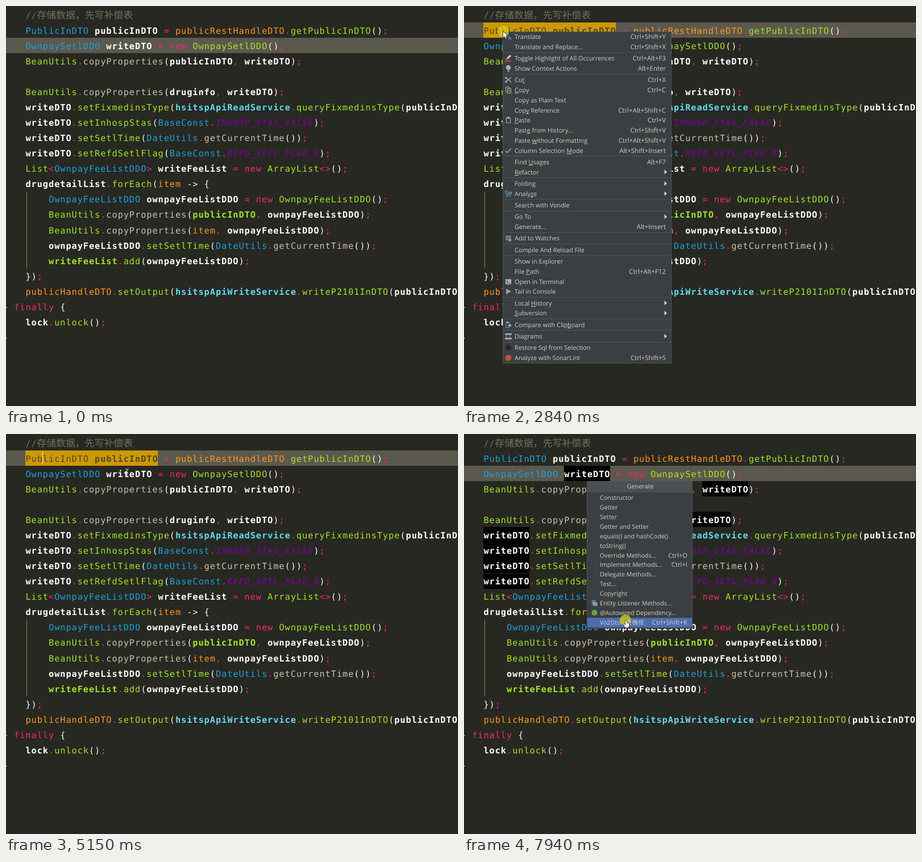
An HTML page with a canvas for the animation above (8 s loop, 795 px wide and 705 px high).

```html
<!DOCTYPE html>
<html lang="en">
<head>
<meta charset="utf-8">
<title>Editor menus</title>
<style>
html, body { margin: 0; width: 100%; height: 100%; overflow: hidden; background: #272822; }
canvas { display: block; }
</style>
</head>
<body>
<canvas id="stage" width="795" height="705"></canvas>
<script>
const ctx = document.getElementById('stage').getContext('2d');
const LOOP = 8000;
const LEFT = 34, CHAR = 10.134, ROW = 27.06, BASE = 21.7;
const MONO = '15.3px "DejaVu Sans Mono", monospace';
const HAN = '16.89px "Noto Sans CJK SC", sans-serif';
const UI = 'px "Open Sans", "Noto Sans CJK SC", sans-serif';
const GRAY = '#afb1b3', TEXT = '#cecece', PANEL = '#3c3f41', EDGE = '#515456', HOVER = '#4b6eaf';

// Prefix of a word: b type, w variable, f field, h outer variable, o parameter, k constant, c static call, p keyword
const STYLES = {
  b: ['', '#1fa0dc'], w: ['bold ', '#ffffff'], f: ['bold ', '#66d9ef'], h: ['bold ', '#a6e22e'],
  o: ['', '#fd971f'], k: ['italic bold ', '#660e7a'], c: ['', '#cfbfad'], p: ['', '#f92672'], g: ['', '#a6e22e']
};
const CODE = [
  '',
  'b:PublicInDTO w:publicInDTO = o:publicRestHandleDTO.getPublicInDTO();',
  'b:OwnpaySetlDDO w:writeDTO = p:new OwnpaySetlDDO();',
  'BeanUtils.c:copyProperties(w:publicInDTO, w:writeDTO);',
  '',
  'BeanUtils.c:copyProperties(w:druginfo, w:writeDTO);',
  'w:writeDTO.setFixmedinsType(f:hsitspApiReadService.queryFixmedinsType(w:publicInDTO));',
  'w:writeDTO.setInhospStas(b:BaseConst.k:INHOSP_STAS_FALSE);',
  'w:writeDTO.setSetlTime(b:DateUtils.c:getCurrentTime());',
  'w:writeDTO.setRefdSetlFlag(b:BaseConst.k:REFD_SETL_FLAG_0);',
  'List<b:OwnpayFeeListDDO> w:writeFeeList = p:new ArrayList<>();',
  'w:drugdetailList.forEach(o:item -> {',
  '    b:OwnpayFeeListDDO w:ownpayFeeListDDO = p:new OwnpayFeeListDDO();',
  '    BeanUtils.c:copyProperties(h:publicInDTO, w:ownpayFeeListDDO);',
  '    BeanUtils.c:copyProperties(o:item, w:ownpayFeeListDDO);',
  '    w:ownpayFeeListDDO.setSetlTime(b:DateUtils.c:getCurrentTime());',
  '    h:writeFeeList.add(w:ownpayFeeListDDO);',
  '});',
  'o:publicHandleDTO.setOutput(f:hsitspApiWriteService.writeP2101InDTO(w:publicInDTO));',
  '} p:finally {',
  'w:lock.unlock();',
  '}'
];
const TOKENS = CODE.map((line, i) => {
  let col = i === 19 || i === 21 ? -4 : 0;
  return [...line.matchAll(/(?:([a-z]):)?(\w+)|->|[^\w]/g)].map(m => {
    const text = m[2] || m[0];
    const mark = '.,;=<>'.includes(text) ? STYLES.p : ['', '#f8f8f2'];
    const [weight, color] = m[2] ? STYLES[m[1] || 'g'] : mark;
    const token = { text, weight, color, col };
    col += text.length;
    return token;
  });
});
const USES = [[2, 14], [3, 38], [5, 35], [6, 0], [7, 0], [8, 0], [9, 0]];

// Groups of [label, shortcut, icon]; & marks a mnemonic, > a submenu
const GROUPS = [
  [['Translate', 'Ctrl+Shift+Y', 'lang'], ['Translate and Replace...', 'Ctrl+Shift+X']],
  [['Toggle Highlight of All Occurrences', 'Ctrl+Alt+F3', 'pen'], ['Show Context Actions', 'Alt+Enter', 'bulb']],
  [['Cu&t', 'Ctrl+X', 'cut'], ['&Copy', 'Ctrl+C', 'copy'], ['Copy as Plain Text'],
    ['Cop&y Reference', 'Ctrl+Alt+Shift+C'], ['&Paste', 'Ctrl+V', 'paste'],
    ['Past&e from History...', 'Ctrl+Shift+V'], ['Paste &without Formatting', 'Ctrl+Alt+Shift+V'],
    ['Column Selection &Mode', 'Alt+Shift+Insert', 'check']],
  [['Find &Usages', 'Alt+F7'], ['&Refactor', '>']],
  [['Folding', '>'], ['Analy&ze', '>', 'scan']],
  [['Search with Vondle']],
  [['Go To', '>'], ['Generate...', 'Alt+Insert']],
  [['Add to Watches', '', 'watch']],
  [['Compile And Reload File']],
  [['Show in Explorer'], ['File &Path', 'Ctrl+Alt+F12'], ['Open in Terminal', '', 'term'], ['Tail in Console', '', 'play']],
  [['Local &History', '>'], ['&Subversion', '>']],
  [['Compare with Clip&board', '', 'diff']],
  [['Diagrams', '>', 'diagram']],
  [['Restore Sql from Selection', '', 'sql'], ['Analyze with SonarLint', 'Ctrl+Shift+S', 'lint']]
];
const SELECTION_ONLY = /^(Cu&t|&Copy|Copy as|Search|Add to)/;
const SHORT_GROUPS = GROUPS.map(g => g.filter(i => !SELECTION_ONLY.test(i[0]))).filter(g => g.length);

const GENERATE = [
  ['Constructor'], ['Getter'], ['Setter'], ['Getter and Setter'], ['equals() and hashCode()'], ['toString()'],
  ['Override Methods...', 'Ctrl+O'], ['Implement Methods...', 'Ctrl+I'], ['Delegate Methods...'], ['Test...'],
  ['Copyright'], ['Entity Listener Methods...', '', 'entity'], ['@Autowired Dependency...', '', 'leaf'],
  ['Vo2Dto - 老槐叔', 'Ctrl+Shift+K']
];

// Pointer moves: start, end, steps, from, to
const MOVES = [
  [120, 500, 6, [603, 480], [136, 130]],
  [580, 810, 4, [160, 105], [256, 47]],
  [970, 1050, 2, [262, 47], [270, 47]],
  [1280, 1750, 7, [270, 47], [48, 43]],
  [1910, 1990, 2, [42, 43], [36, 44]],
  [2210, 2520, 5, [40, 45], [68, 46]],
  [2680, 2680, 1, [69, 45], [69, 45]],
  [2840, 3290, 7, [69, 45], [135, 192]],
  [3290, 3520, 4, [135, 192], [150, 213]],
  [3680, 3900, 4, [146, 205], [125, 168]],
  [4050, 4290, 4, [122, 165], [112, 153]],
  [4596, 5150, 8, [114, 151], [213, 68]],
  [5220, 5220, 1, [213, 67], [213, 67]],
  [5770, 5920, 3, [220, 78], [278, 244]],
  [5920, 6150, 4, [278, 244], [290, 336]],
  [7330, 7710, 6, [290, 336], [285, 329]]
];
const PRESSES = [[1280, 2210], [2680, 2915], [4440, 4518], [5220, 5380], [6860, 6940], [7940, 8000]];

const within = (t, a, b) => t >= a && t < b;

function pointerAt(t) {
  const move = MOVES.filter(m => m[0] <= t).pop();
  if (!move) return null;
  const [a, b, n, from, to] = move;
  const step = n > 1 ? Math.min(n - 1, Math.floor((t - a) / (b - a) * (n - 1) + 0.1)) / (n - 1) : 1;
  return from.map((v, i) => v + (to[i] - v) * step);
}

function box(x, y, w, h, color) {
  ctx.fillStyle = color;
  ctx.fillRect(x, y, w, h);
}
function frame(x, y, w, h, color) {
  ctx.lineWidth = 1;
  ctx.strokeStyle = color;
  ctx.strokeRect(x, y, w, h);
}
function dot(x, y, r, color) {
  ctx.fillStyle = color;
  ctx.beginPath();
  ctx.arc(x, y, r, 0, Math.PI * 2);
  ctx.fill();
}
function line(points, color, width = 1.3) {
  ctx.beginPath();
  points.forEach(([x, y]) => ctx.lineTo(x, y));
  ctx.strokeStyle = color;
  ctx.lineWidth = width;
  ctx.stroke();
}
function shape(points, color, edge) {
  ctx.beginPath();
  points.forEach(([x, y]) => ctx.lineTo(x, y));
  ctx.closePath();
  ctx.fillStyle = color;
  if (edge) {
    ctx.strokeStyle = edge;
    ctx.lineWidth = 1.4;
    ctx.stroke();
  }
  ctx.fill();
}
function label(text, x, y, color, size = 10.9, align = 'left') {
  ctx.font = size + UI;
  ctx.textAlign = align;
  ctx.fillStyle = color;
  ctx.fillText(text, x, y);
  ctx.textAlign = 'left';
}

// Each icon is drawn around its own centre
const ICONS = {
  lang() { label('文', -6, 2, '#3d9bd0', 8); label('A', 0, 5.5, GRAY, 8.5); },
  pen(dim) {
    line([[-3, 2], [4, -5]], dim ? '#777' : '#d8d8d8', 3);
    line([[-4, 3], [-1, 0]], dim ? '#666' : '#d65a45', 3);
    line([[-6, 5.5], [5, 5.5]], dim ? '#666' : '#c75450', 1.5);
  },
  bulb() { dot(0, -1.5, 4.2, GRAY); box(-2, 3.2, 4, 1, GRAY); box(-1.5, 5, 3, 1, GRAY); },
  cut() {
    line([[-4, 3], [5, -4]], GRAY); line([[-4, -3], [5, 4]], GRAY);
    dot(-4, -3.5, 2, GRAY); dot(-4, 3.5, 2, GRAY); dot(-4, -3.5, 0.8, PANEL); dot(-4, 3.5, 0.8, PANEL);
  },
  copy() {
    frame(-4.5, -5, 6, 8, GRAY); box(-2, -3, 7, 9, PANEL); frame(-1.5, -2.5, 6, 8, GRAY);
    box(0, 0, 3, 1, GRAY); box(0, 2, 3, 1, GRAY);
  },
  paste() { frame(-3.5, -4, 7, 9, GRAY); box(-2, -5.5, 4, 3, GRAY); },
  check() { line([[-5, 0], [-2, 3.5], [5, -4]], GRAY); },
  scan() {
    frame(-5.5, -5, 4, 4, '#3d9bd0'); frame(-3.5, 1, 3, 4, '#3d9bd0');
    frame(1, -3, 4, 4, GRAY); line([[3, 1], [3, 6]], '#3d9bd0');
  },
  watch() { [-4, -1, 2].forEach(y => box(-5, y, 10, 1.3, GRAY)); line([[0, 5], [5, 5]], GRAY); dot(3, 3, 1.8, GRAY); },
  term() { box(-5, -4.5, 10, 9, GRAY); line([[-3, -2], [-1, 0], [-3, 2]], PANEL); box(0, 2, 3, 1, PANEL); },
  play() { shape([[-4, -5], [5, 0], [-4, 5]], '#9a9c9e'); },
  diff() {
    frame(-4.5, -4.5, 6, 9, '#4a9cc9'); box(-3, -6, 3, 3, GRAY);
    line([[-1, 1], [5, 1]], GRAY, 1.8); shape([[2, -2], [6, 1], [2, 4]], GRAY);
  },
  diagram() {
    box(-6, -5, 12, 2.5, GRAY); box(-6, 3, 12, 2.5, GRAY);
    line([[-3, -3], [-3, 3]], '#4a9cc9'); line([[3, -3], [3, 3]], '#4a9cc9');
  },
  sql() { dot(0, 0, 5, '#2c2522'); },
  lint() { dot(0, 0, 5.5, '#c2513f'); },
  entity() { box(-5, -5, 7, 8, '#4a88b5'); box(-2, -1, 7, 6, GRAY); [1, 3].forEach(y => box(-1, y, 5, 1, '#4a6a80')); },
  leaf() { dot(0, 0, 5, '#62a844'); }
};
function icon(name, x, y, dim) {
  ctx.save();
  ctx.translate(x, y);
  ICONS[name](dim);
  ctx.restore();
}

// Every glyph sits in the middle of its own cell
function cell(char, col, row) {
  ctx.textAlign = 'center';
  ctx.fillText(char, LEFT + (col + 0.5) * CHAR, BASE + ROW * row);
  ctx.textAlign = 'left';
}

function drawCode(selFrom, t) {
  const rowTop = i => Math.round(2 + ROW * i);
  box(0, 0, 795, 705, '#272822');
  box(0, 700, 795, 5, '#2b2328');
  box(0, rowTop(within(t, 1280, 5220) ? 1 : 2), 795, 27, '#5b594d');
  if (t >= 5550) USES.forEach(([r, c]) => box(LEFT + c * CHAR, rowTop(r), 8 * CHAR, 27, '#000'));
  if (within(t, 5220, 5550)) box(LEFT, 29, 11 * CHAR, 27, '#000');
  if (selFrom < 23) box(LEFT + selFrom * CHAR, 29, (23 - selFrom) * CHAR, 27, '#cc9900');
  box(36, 327, 1, 135, '#a87a2c');

  ctx.font = MONO;
  ctx.fillStyle = '#75715e';
  cell('/', 0, 0);
  cell('/', 1, 0);
  ctx.font = HAN;
  ctx.fillText('存储数据，先写补偿表', LEFT + 2 * CHAR, BASE);
  TOKENS.forEach((tokens, row) => tokens.forEach(({ text, weight, color, col }) => {
    ctx.font = weight + MONO;
    [...text].forEach((char, i) => {
      const selected = row === 1 && within(col + i, selFrom, 23);
      ctx.fillStyle = selected ? '#4f4526' : color;
      cell(char, col + i, row);
    });
  }));
}

function drawItemText(text, x, y, color) {
  const at = text.indexOf('&'), plain = text.replace('&', '');
  label(plain, x, y, color);
  if (at < 0) return;
  const start = x + ctx.measureText(plain.slice(0, at)).width;
  box(start, Math.round(y + 1), ctx.measureText(plain[at]).width, 1, color);
}

function drawMenu(groups, x, y, pointer, noSelection) {
  const H = 17.76, GAP = 2.55, W = 297;
  const count = groups.flat().length;
  const height = Math.round(count * H + (groups.length - 1) * GAP + 1);
  box(x, y, W, height, PANEL);
  let top = y + 0.2;
  groups.forEach((group, g) => {
    if (g) {
      box(x + 1, Math.round(top + 0.8), W - 2, 1, EDGE);
      top += GAP;
    }
    group.forEach(([text, keys, art]) => {
      const mid = top + H / 2, base = Math.round(mid + 4), dim = noSelection && art === 'pen';
      const over = pointer[0] > x + 2 && pointer[1] > y + 1 && within(pointer[1], top, top + H);
      if (over) box(x + 1, Math.round(top), W - 2, 18, HOVER);
      const color = dim ? '#7c7c7c' : TEXT;
      drawItemText(text, x + 21, base, color);
      if (keys === '>') shape([[x + 284.5, mid - 4], [x + 289, mid], [x + 284.5, mid + 4]], '#d4d4d4');
      else if (keys) label(keys, x + 287, base, color, 11.4, 'right');
      if (art) icon(art, x + 10, Math.round(mid), dim);
      top += H;
    });
  });
  frame(x + 0.5, y + 0.5, W - 1, height - 1, EDGE);
}

function drawGenerate(hover) {
  const H = 16.92;
  box(216, 83, 186, 260, PANEL);
  box(216, 83, 186, 20, '#4b4f51');
  label('Generate', 310, 96, TEXT, 10.9, 'center');
  GENERATE.forEach(([text, keys, art], i) => {
    const mid = 112 + i * H, base = Math.round(mid + 4);
    if (i === hover) box(217, Math.round(mid - H / 2), 184, 17, HOVER);
    label(text, 239, base, TEXT, 10.7);
    if (keys) label(keys, 393, base, TEXT, 11.3, 'right');
    if (art) icon(art, 229.5, mid);
  });
  frame(216.5, 83.5, 185, 259, EDGE);
}

function drawPointer([x, y], kind) {
  ctx.save();
  ctx.translate(x, y);
  if (kind === 'beam') {
    line([[-3, -6.5], [0, -5.5], [3, -6.5]], '#e4e4e4', 1);
    line([[0, -5.5], [0, 6.5]], '#e4e4e4', 1);
    line([[-3, 7.5], [0, 6.5], [3, 7.5]], '#e4e4e4', 1);
  } else if (kind === 'arrow') {
    shape([[0, 0], [0, 10.5], [2.4, 8.3], [4, 12], [5.8, 11.2], [4.2, 7.6], [7.5, 7.5]], '#fff', '#222');
  } else {
    shape([[-1, 0], [1, 0], [1, 4], [5, 5], [5.5, 8], [4, 12], [-1, 12], [-4.5, 7], [-3, 6], [-1, 8]], '#fff', '#333');
  }
  ctx.restore();
}

function draw(t) {
  const pointer = pointerAt(t);
  let selFrom = 23;
  if (within(t, 1280, 1990)) selFrom = Math.max(0, Math.min(23, Math.round((pointer[0] - LEFT) / CHAR + 0.2)));
  else if (within(t, 1990, 5220)) selFrom = 0;

  const menuA = within(t, 2840, 4518), menuB = within(t, 5550, 6940), popup = t >= 6940;
  drawCode(selFrom, t);
  if (within(t, 1280, 5220) && !menuA) {
    const col = t < 2680 ? selFrom : 3;
    box(Math.round(LEFT + col * CHAR - 0.5), 31, 1, 23, '#e6dfc4');
  }
  if (menuA) drawMenu(GROUPS, 68, 45, pointer, false);
  if (menuB) drawMenu(SHORT_GROUPS, 213, 67, pointer, true);
  if (popup) drawGenerate(t < 7330 ? 0 : 13);
  if (!pointer) return;
  if (PRESSES.some(([a, b]) => within(t, a, b))) {
    const shift = popup ? -1 : 0;
    dot(pointer[0] + shift, pointer[1] + shift, 10, 'rgba(214,204,32,0.76)');
  }
  drawPointer(pointer, t >= 7330 ? 'hand' : menuA || menuB || popup ? 'arrow' : 'beam');
}

ctx.textRendering = 'geometricPrecision';
const begin = performance.now();
function tick() {
  draw((performance.now() - begin) % LOOP);
  requestAnimationFrame(tick);
}
tick();
</script>
</body>
</html>
```
